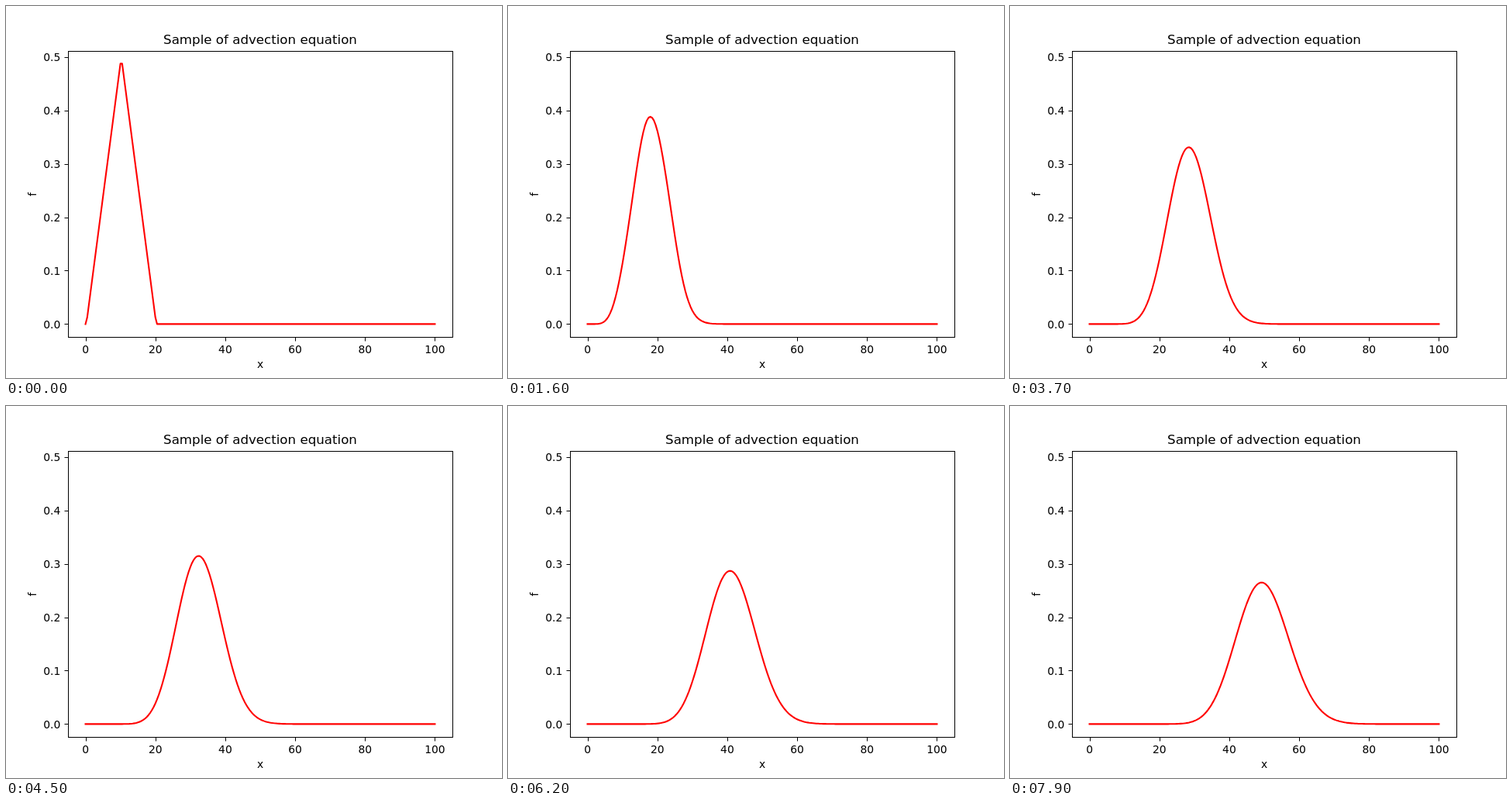
An HTML page for the animation above (8 s loop, 640x480 px).

```html
<!DOCTYPE html>
<html lang="en">
<head>
<meta charset="utf-8">
<title>Advection</title>
<style>
  html, body { margin: 0; width: 100%; height: 100%; overflow: hidden; background: #fff; }
  svg { display: block; width: 640px; height: 480px; }
  text { font: 13.889px "DejaVu Sans", sans-serif; text-anchor: middle; }
  .title { font-size: 16.667px; }
  .end { text-anchor: end; }
  .axis { fill: none; stroke: #000; }
  #curve { fill: none; stroke: #f00; stroke-width: 2.083; stroke-linejoin: round; stroke-linecap: square; }
</style>
</head>
<body>
<svg viewBox="0 0 640 480">
  <path id="curve"/>
  <g id="ticks"></g>
  <rect class="axis" x="80.5" y="58.5" width="496" height="369"/>
  <text class="title" x="328" y="49">Sample of advection equation</text>
  <text x="328" y="467">x</text>
  <text transform="translate(39 243) rotate(-90)">f</text>
</svg>
<script>
const CELLS = 200, DX = 0.5, STEPS = 80, STEP_MS = 100;
const PEAK = 0.4875;
const px = x => 102.545 + x * 4.50909;
const py = f => 410.4 - f * 336 / PEAK;

// Axis ticks
let marks = '';
for (let i = 0; i < 6; i++) {
  const x = px(i * 20), y = py(i / 10);
  const col = Math.round(x) + 0.5, row = Math.round(y) + 0.5;
  marks += `<path class="axis" d="M${col} 427.5v5M80.5 ${row}h-5"/>
    <text x="${x}" y="448">${i * 20}</text>
    <text class="end" x="70.3" y="${Math.round(y + 5.2)}">${(i / 10).toFixed(1)}</text>`;
}
document.getElementById('ticks').innerHTML = marks;

// Triangular pulse sampled at cell centres, with zero inflow at i = 0
const initial = Array.from({ length: CELLS + 1 }, (_, i) =>
  i ? Math.max(0, 0.5 - Math.abs((i - 0.5) * DX - 10) / 20) : 0);

// Implicit upwind step with Courant number 1
function advance(f) {
  const next = [0];
  for (let i = 1; i < f.length; i++) next[i] = (f[i] + next[i - 1]) / 2;
  return next;
}

const toPath = f =>
  'M' + f.map((v, i) => px(i * DX).toFixed(2) + ' ' + py(v).toFixed(3)).join('L');

const paths = [];
for (let n = 0, f = initial; n < STEPS; n++, f = advance(f)) paths.push(toPath(f));

const curve = document.getElementById('curve');
const start = performance.now();
function draw() {
  const step = Math.floor((performance.now() - start) / STEP_MS) % STEPS;
  curve.setAttribute('d', paths[step]);
  requestAnimationFrame(draw);
}
draw();
</script>
</body>
</html>
```
